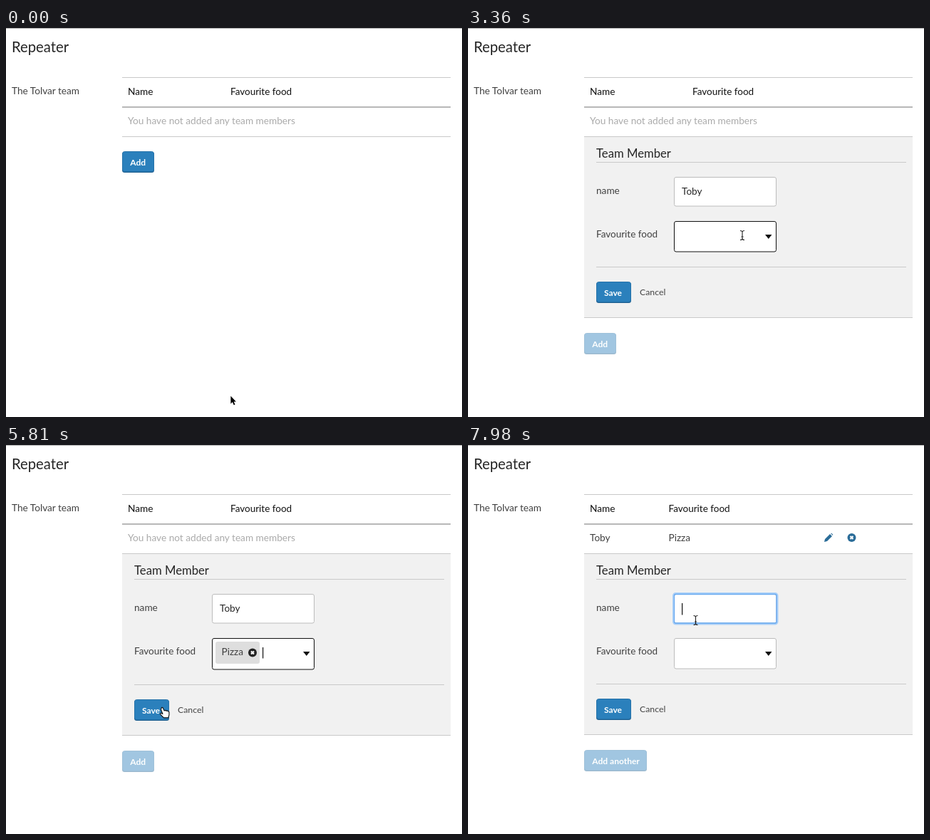
Animation of 640 by 546 pixels, one loop 8000 ms. Source, as an HTML page:

```html
<!DOCTYPE html>
<html lang="en">
<head>
<meta charset="utf-8">
<title>Repeater</title>
<style>
  html, body { margin: 0; width: 100%; height: 100%; overflow: hidden; background: #fff; }
  svg { display: block; width: 640px; height: 546px; }
  text { font: 13.65px Lato, "Open Sans", sans-serif; fill: #262626; white-space: pre; }
  .title { font-size: 20.3px; }
  .legend { font-size: 16.7px; }
  .label { fill: #404040; }
  .head { fill: #111; }
  .food { font-size: 13.5px; }
  .empty { fill: #aaa; }
  .btn { font-size: 12px; font-weight: 700; fill: #fff; }
  .link { font-size: 12.3px; fill: #444; }
  .edge { fill: #1d5f90; }
  .face { fill: #2b80bc; stroke: #2673aa; }
  .rule { stroke: #c9c9c9; }
  .strong { stroke: #b8b8b8; stroke-width: 2; }
  .field { fill: #fff; stroke: #bcbcbc; }
  .caret { stroke: #111; stroke-width: 1.2; }
</style>
</head>
<body>
<svg viewBox="0 0 640 546">
  <defs>
    <g id="cross">
      <circle r="6"/>
      <path d="M-2-2L2 2M2-2L-2 2" stroke="#fff" stroke-width="2.1"/>
    </g>
  </defs>

  <path d="M0 .5H640" stroke="#b0b0b0"/>
  <text class="title" x="8" y="34">Repeater</text>
  <text class="label" x="8" y="92.5">The Tolvar team</text>

  <path class="rule" d="M163 69.5H624M163 152.5H624"/>
  <path class="strong" d="M163 111H624"/>
  <text class="head" x="171" y="93.5">Name</text>
  <text class="head food" id="foodHead" y="93.5">Favourite food</text>
  <text class="empty" id="empty" x="171" y="135.3">You have not added any team members</text>

  <g id="row">
    <text class="label" x="171" y="135.3">Toby</text>
    <text class="label" id="rowFood" y="135.3">Pizza</text>
    <g id="icons" fill="#2a6c98">
      <path d="M-6 6L-5 2 2-5 5-2-2 5ZM3-6L4.2-6.2 6.2-4.2 6-3Z"/>
      <use href="#cross" x="32.5"/>
    </g>
  </g>

  <g id="form">
    <rect id="panel" x="163" y="153" width="461" fill="#f1f1f1"/>
    <text class="legend" x="180" y="182">Team Member</text>
    <path class="rule" d="M180 188.5H615"/>
    <text class="label" x="180" y="232.5">name</text>
    <text class="label food" x="180" y="294">Favourite food</text>

    <rect class="field" x="289.5" y="209.5" width="143" height="40.5" rx="2.5"/>
    <g id="ring" fill="none">
      <rect x="288.5" y="208.5" width="145.5" height="42.5" rx="3" stroke="#a9cff8" stroke-width="3"/>
      <rect x="289.5" y="209.5" width="143.5" height="40.5" rx="2" stroke="#6aaaf0" stroke-width="1.3"/>
    </g>
    <text id="typed" x="300" y="233.5"></text>
    <path class="caret" id="nameCaret" d="M0 222V238.5"/>

    <rect class="field" id="select" x="289.5" y="271.5" width="143" rx="2.5"/>
    <path d="M417 290H426.5L421.8 296Z" fill="#111"/>
    <g id="chip">
      <rect x="294" y="276" width="62" height="31" rx="3" fill="#dedede"/>
      <text class="label" x="302.5" y="295">Pizza</text>
      <use href="#cross" x="346" y="291.5" fill="#222"/>
    </g>
    <path class="caret" id="foodCaret" d="M360.6 284V299.5"/>

    <g id="lower">
      <path class="rule" d="M180 335.5H615M163 406.5H624"/>
      <rect class="edge" x="180" y="357" width="49" height="29" rx="3.5"/>
      <rect class="face" x="180.5" y="356.5" width="48" height="28" rx="3"/>
      <text class="btn" x="191" y="375.6">Save</text>
      <text class="link" x="241" y="375.3">Cancel</text>
    </g>

    <g id="menu">
      <rect class="field" x="289.5" y="314.5" width="143" height="92" rx="1.5"/>
      <rect id="pick" x="290" width="142" height="31" fill="#619eff"/>
      <path d="M289.5 314.5H432.5" stroke="#111"/>
    </g>
  </g>

  <g id="add">
    <rect class="edge" id="addEdge" x="163" y="174" height="29" rx="3.5"/>
    <rect class="face" id="addFace" x="163.5" y="173.5" height="28" rx="3"/>
    <text class="btn" id="addText" x="174.3" y="192.8"></text>
  </g>

  <g id="cursor">
    <path id="arrow" d="M.4.6V11.4L2.9 9.1 4.8 13.2 6.5 12.4 4.7 8.4H7.9Z" fill="#000" stroke="#fff" paint-order="stroke"/>
    <g id="beam" fill="none">
      <path d="M-3-6.5Q0-6.5 0-4.5Q0-6.5 3-6.5M0-5V5M-3 6.5Q0 6.5 0 4.5Q0 6.5 3 6.5M-1.5 2H1.5" stroke="#222" stroke-width="1.1"/>
    </g>
    <path id="hand" d="M-1.6.8Q-1-.6.4.4L2.4 4.6Q4 3.4 5 4.8Q6.6 4 7.4 5.4Q9 5 9.2 7V10.5L8 14.5H1.6L-3.2 9.6Q-4 7.6-1.6 8.2L.2 9.2-2.2 3Z" fill="#fff" stroke="#111" stroke-width="1.1" stroke-linejoin="round"/>
  </g>
</svg>

<script>
const LOOP = 8000, STEP = 70;
const OPEN = 770, SAVE = 6090, REOPEN = 7490;
const TAB = 2800, DROP = 3500, CHOOSE = 4550;

// time, x, y of the pointer
const path = [
  [0, 315, 516], [770, 187, 191], [840, 187, 191], [1470, 371, 244],
  [2940, 371, 244], [3360, 385, 291], [3500, 385, 291], [3930, 381, 384],
  [4200, 381, 346], [4480, 377, 338], [4760, 377, 338], [4970, 379, 335.5],
  [5110, 379, 335.5], [5950, 207, 371], [6090, 207, 371], [6300, 225, 350],
  [6860, 214, 245], [7280, 205, 191], [7420, 205, 191], [7840, 319, 243],
  [7980, 319.5, 246]
];
const keys = [[2100, 1], [2380, 3], [2520, 4]];
const options = ["Pizza", "Gravy", "Yorkshire Pudding"];

const el = {};
document.querySelectorAll("svg [id]").forEach(n => el[n.id] = n);
const set = (id, attrs) => {
  for (const k in attrs) el[id].setAttribute(k, attrs[k]);
};
const show = (id, on) => el[id].style.display = on ? "" : "none";
const move = (id, x, y) => set(id, { transform: `translate(${x} ${y})` });
const within = (t, a, b) => t >= a && t < b;
const ramp = (t, from, length) => Math.min(1, Math.max(0, (t - from) / length));

const labels = options.map((name, i) => {
  const n = document.createElementNS("http://www.w3.org/2000/svg", "text");
  n.textContent = name;
  n.setAttribute("x", 295);
  n.setAttribute("y", 333 + 31 * i);
  return el.menu.appendChild(n);
});

function pointer(t) {
  const i = path.findIndex(p => p[0] > t);
  if (i < 0) return path[path.length - 1].slice(1);
  const [t0, x0, y0] = path[i - 1], [t1, x1, y1] = path[i];
  const u = (t - t0) / (t1 - t0), k = u * u * (3 - 2 * u);
  return [x0 + (x1 - x0) * k, y0 + (y1 - y0) * k];
}

function draw(t) {
  const saved = t >= SAVE, again = t >= REOPEN;
  const open = within(t, OPEN, SAVE) || again;
  const dropped = within(t, DROP, CHOOSE);
  const chosen = within(t, CHOOSE, SAVE);
  const naming = within(t, OPEN, TAB) || again;
  const opened = again ? REOPEN : OPEN;
  const grow = chosen ? 1 : 0;

  // table
  show("empty", !saved);
  show("row", saved);
  const foodX = saved ? (again ? 281.5 : 282.5) : 315;
  set("foodHead", { x: foodX });
  set("rowFood", { x: foodX });
  move("icons", again ? 506 : 508, 130);

  // form
  show("form", open);
  set("panel", { height: 253 + grow });
  set("select", { height: 42.5 + grow, style: within(t, TAB, SAVE) ? "stroke:#111" : "" });
  move("lower", 0, grow);
  show("ring", naming);
  set("ring", { opacity: ramp(t, opened, 210) });
  const count = saved ? 0 : keys.reduce((n, k) => t >= k[0] ? k[1] : n, 0);
  el.typed.textContent = "Toby".slice(0, count);
  show("nameCaret", naming && !within(t, 1890, 2100));
  move("nameCaret", 300.6 + (open && count ? el.typed.getComputedTextLength() + .8 : 0), 0);
  show("chip", chosen);
  show("foodCaret", chosen && !within(t, 5180, 5740));

  // add button
  const width = saved ? 88 : 45;
  set("addEdge", { width });
  set("addFace", { width: width - 1 });
  el.addText.textContent = saved ? "Add another" : "Add";
  move("add", 0, open ? 255 + grow : 0);
  set("add", { opacity: open ? 1 - .56 * ramp(t, opened, 280) : 1 });

  // pointer and menu
  const [x, y] = pointer(t);
  const inBox = (l, top, r, b) => x >= l && x <= r && y >= top && y <= b;
  const beam = open && (inBox(289, 209, 433, 250) || inBox(289, 271, 433, 314));
  const hand = dropped && inBox(289, 314, 433, 407)
    || open && inBox(180, 356, 229, 387)
    || !open && inBox(163, 173, 163 + width, 203);
  show("cursor", !within(t, 2100, 3010));
  move("cursor", x, y);
  show("beam", beam);
  show("hand", hand);
  show("arrow", !beam && !hand);

  show("menu", dropped);
  const active = Math.max(0, Math.min(2, Math.floor((y - 314) / 31)));
  set("pick", { y: 314.5 + 30.6 * active });
  labels.forEach((n, i) => n.style.cssText = i === active ? "fill:#fff;font-weight:700" : "");
}

const start = performance.now();
function tick() {
  const t = (performance.now() - start) % LOOP;
  draw(Math.floor(t / STEP) * STEP);
  requestAnimationFrame(tick);
}
tick();
</script>
</body>
</html>
```
